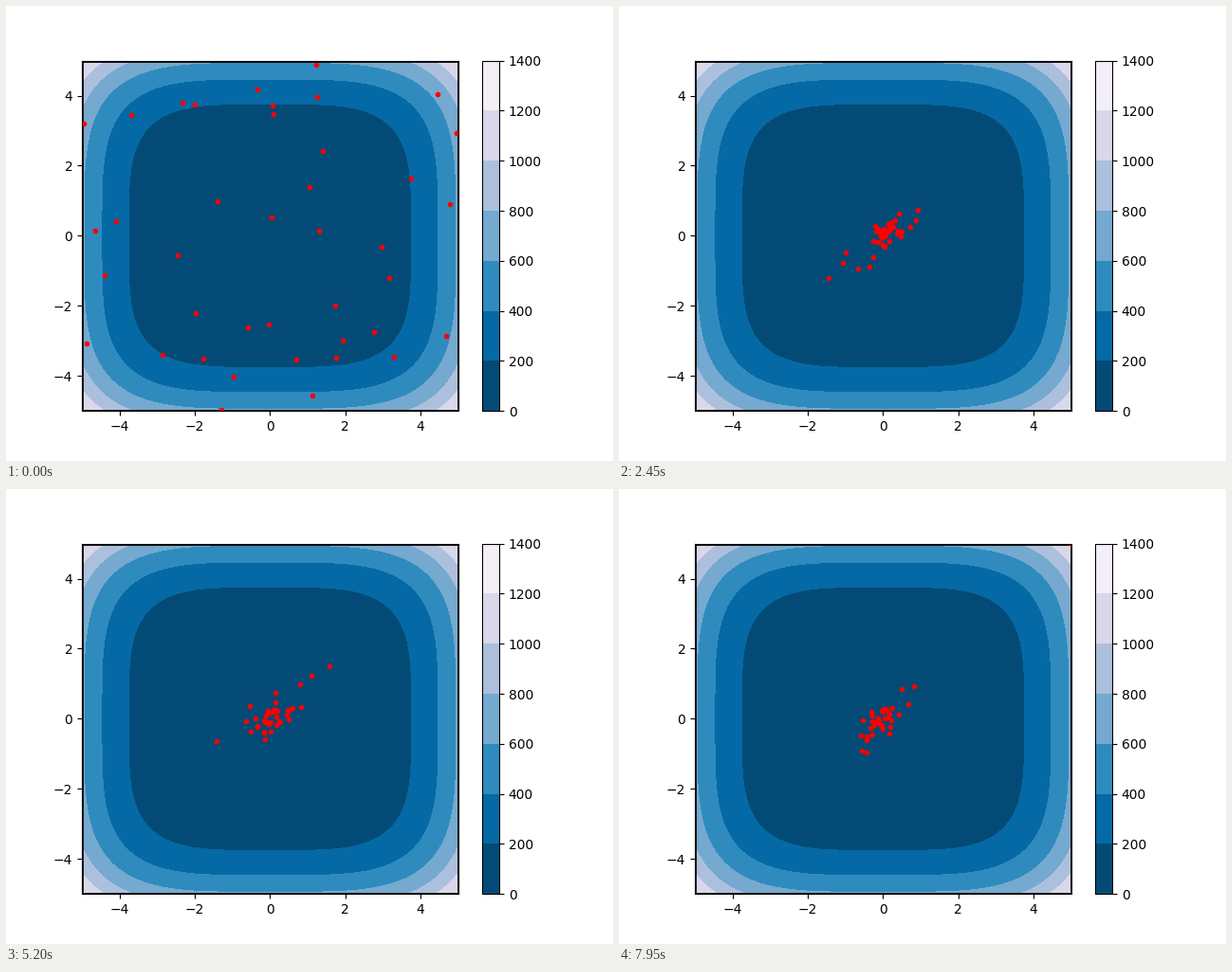
A matplotlib script for the animation above (8000 ms loop, 640 px wide and 480 px high).

```python
import numpy as np
import matplotlib.pyplot as plt
from matplotlib.animation import FuncAnimation

FRAMES, STEP_MS = 160, 50
COUNT, BOUND = 40, 5

start = np.random.default_rng(7).uniform(-BOUND, BOUND, (COUNT, 2))


def swarm(n):
    """Positions at step n: a core around the minimum plus heavy-tailed flights."""
    if n == 0:
        return start
    rng = np.random.default_rng(n)
    core = rng.normal(0, 0.2, (COUNT, 2))
    # One signed length per particle, so far flights run along the diagonal.
    flight = 0.4 * rng.standard_t(1.5, (COUNT, 1)) * rng.uniform(0, 1, (COUNT, 2))
    return np.clip(start * 0.5 ** n + core + flight, -BOUND, BOUND)


fig, ax = plt.subplots(figsize=(6.4, 4.8), dpi=100)
grid = np.linspace(-BOUND, BOUND, 101)
X, Y = np.meshgrid(grid, grid)
bands = ax.contourf(X, Y, X ** 4 + Y ** 4, levels=np.arange(0, 1401, 200), cmap="PuBu_r")
fig.colorbar(bands, ax=ax)
ax.add_patch(plt.Rectangle((-BOUND, -BOUND), 2 * BOUND, 2 * BOUND,
                           ec="black", fc="none", lw=2))
dots, = ax.plot([], [], "r.", markersize=6)
ax.set(xlim=(-BOUND, BOUND), ylim=(-BOUND, BOUND))


def update(n):
    dots.set_data(*swarm(n).T)
    return dots,


anim = FuncAnimation(fig, update, frames=FRAMES, interval=STEP_MS,
                     repeat=True, repeat_delay=0, blit=False)
plt.show()
```
